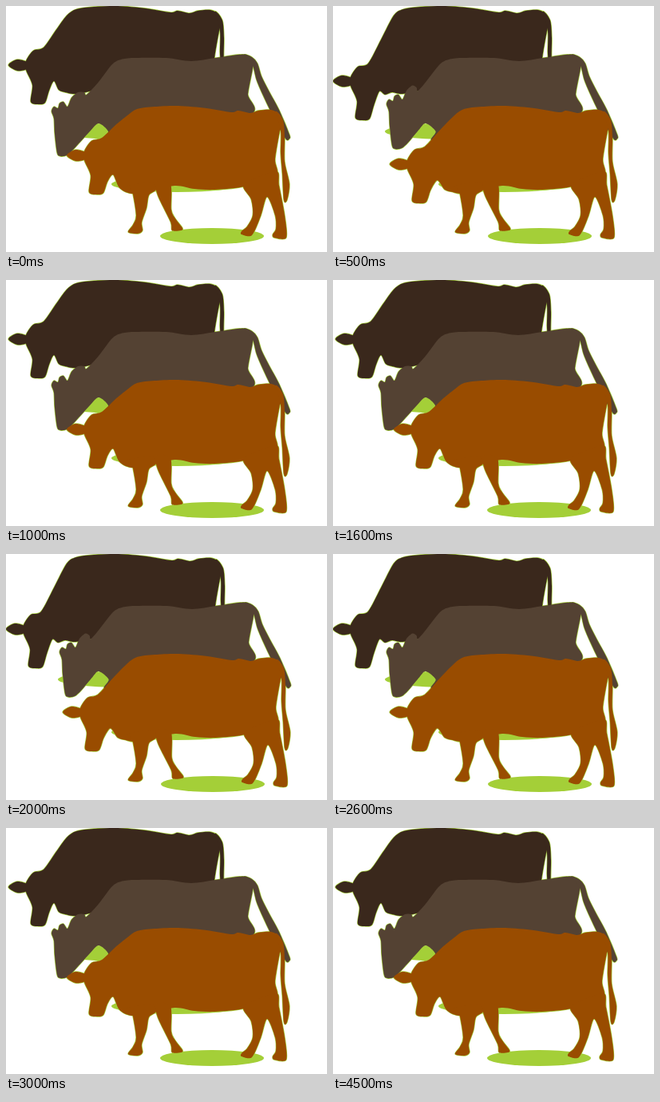
Write an HTML page that moves like this. It is 402x308 px and loops after 5500 ms.

```html
<!DOCTYPE html>
<html lang="en">
<head>
<meta charset="utf-8">
<title>Grazing cows</title>
<style>
  html, body { margin: 0; width: 100%; height: 100%; overflow: hidden; background: #fff; }
  svg { display: block; }
  .halo { fill: none; stroke: #a4cf38; stroke-width: 1.3; }
</style>
</head>
<body>
<svg id="stage" width="402" height="308" viewBox="0 0 402 308"></svg>
<script>
// Key points "x,y" of closed smooth outlines.
const standing = {
  ear: '3,74 14,67 28,71 26,79 14,81',
  body: `25,69 34,56 47,52 62,31 76,12 88,4 110,1 140,0 175,3 206,8 215,6 230,9 240,6 256,5 266,10
    270,20 267,31 261,67 262,87 222,101 185,105 160,104 135,100 100,108 84,110 74,108 66,105
    60,94 54,106 49,121 41,123 31,120 33,99 25,80`,
  tail: '262,7 271,18 273,40 273,70 279,98 276,118 272,118 270,85 268,60 268,32'
};
const legs = {
  frontLeft: '76,100 112,95 112,105 103,112 100,128 94,146 95,156 89,160 77,158 83,149 87,137 82,107',
  frontRight: '112,95 130,98 131,130 136,141 145,153 143,156 132,156 130,145 114,112',
  rear: `222,98 231,117 233,137 226,151 219,157 219,161 232,162 243,138 251,114
    261,137 262,154 258,161 260,165 275,165 273,137 266,100 262,82`
};
const grazer = {
  body: `57,132 60,126 65,128 67,122 72,120 77,126 82,115 90,108 98,108 101,111 116,95 133,73 144,67
    160,65 200,65 232,69 262,65 290,61 301,61 309,67 309,78 303,110 302,138 150,165 123,168
    128,157 116,147 105,157 84,180 76,187 68,188 64,184 61,160 60,141`,
  tail: '298,61 308,64 315,72 320,88 329,106 342,130 355,161 355,166 350,166 334,137 315,96 309,75'
};

// Head offsets are given for the raised and the lowered pose;
// the neck stretches between x = neck[0] (all head) and x = neck[1] (all body).
const cows = [
  { color: '#3a281c', at: [0, 0], neck: [50, 75], head: [[0, 0], [-3, 20]], parts: standing },
  { color: '#544233', at: [0, 0], neck: [85, 118], head: [[0, 0], [10, -9]], parts: grazer },
  { color: '#994c00', at: [76, 125], neck: [50, 75], head: [[-3, -12], [-8, -1]], parts: { ...standing, ...legs } }
];

function smoothstep(from, to, x) {
  const t = Math.min(1, Math.max(0, (x - from) / (to - from)));
  return t * t * (3 - 2 * t);
}

// Closed Catmull-Rom spline written as cubic Béziers.
function spline(pts) {
  const at = i => pts[(i + pts.length) % pts.length];
  const handle = (i, sign) => at(i).map((v, k) => v + sign * (at(i + 1)[k] - at(i - 1)[k]) / 7);
  return 'M' + pts[0] + pts.map((_, i) =>
    `C${handle(i, 1)} ${handle(i + 1, -1)} ${at(i + 1)}`).join('') + 'Z';
}

// Moves the head by its offset and leans the hindquarters one pixel when grazing.
function bend(cow, pose, [x, y]) {
  const [dx, dy] = cow.head[pose];
  const headness = 1 - smoothstep(...cow.neck, x);
  const lean = pose * smoothstep(100, 150, x);
  return [x + cow.at[0] + dx * headness + lean, y + cow.at[1] + dy * headness];
}

function outlines(cow, pose) {
  return Object.values(cow.parts).map(outline => {
    const pts = outline.split(/\s+/).map(p => bend(cow, pose, p.split(',').map(Number)));
    return `<path d="${spline(pts)}"/>`;
  }).join('');
}

const grass = (x, y, rx) => `<ellipse cx="${x}" cy="${y}" rx="${rx}" ry="10" fill="#a4cf38"/>`;

function drawPose(pose) {
  return '<g>' + grass(147, 157, 82) + grass(214, 223, 82) + grass(258 + pose, 288, 65) +
    cows.map(cow => `<g class="halo">${outlines(cow, pose)}</g>`).join('') +
    cows.map(cow => `<g fill="${cow.color}">${outlines(cow, pose)}</g>`).join('') + '</g>';
}

const stage = document.getElementById('stage');
stage.innerHTML = drawPose(0) + drawPose(1);
const [raised, lowered] = stage.children;

function render() {
  const t = performance.now() % 5500;
  const grazing = (t >= 500 && t < 1000) || (t >= 2000 && t < 3000);
  raised.style.display = grazing ? 'none' : '';
  lowered.style.display = grazing ? '' : 'none';
  requestAnimationFrame(render);
}
render();
</script>
</body>
</html>
```
